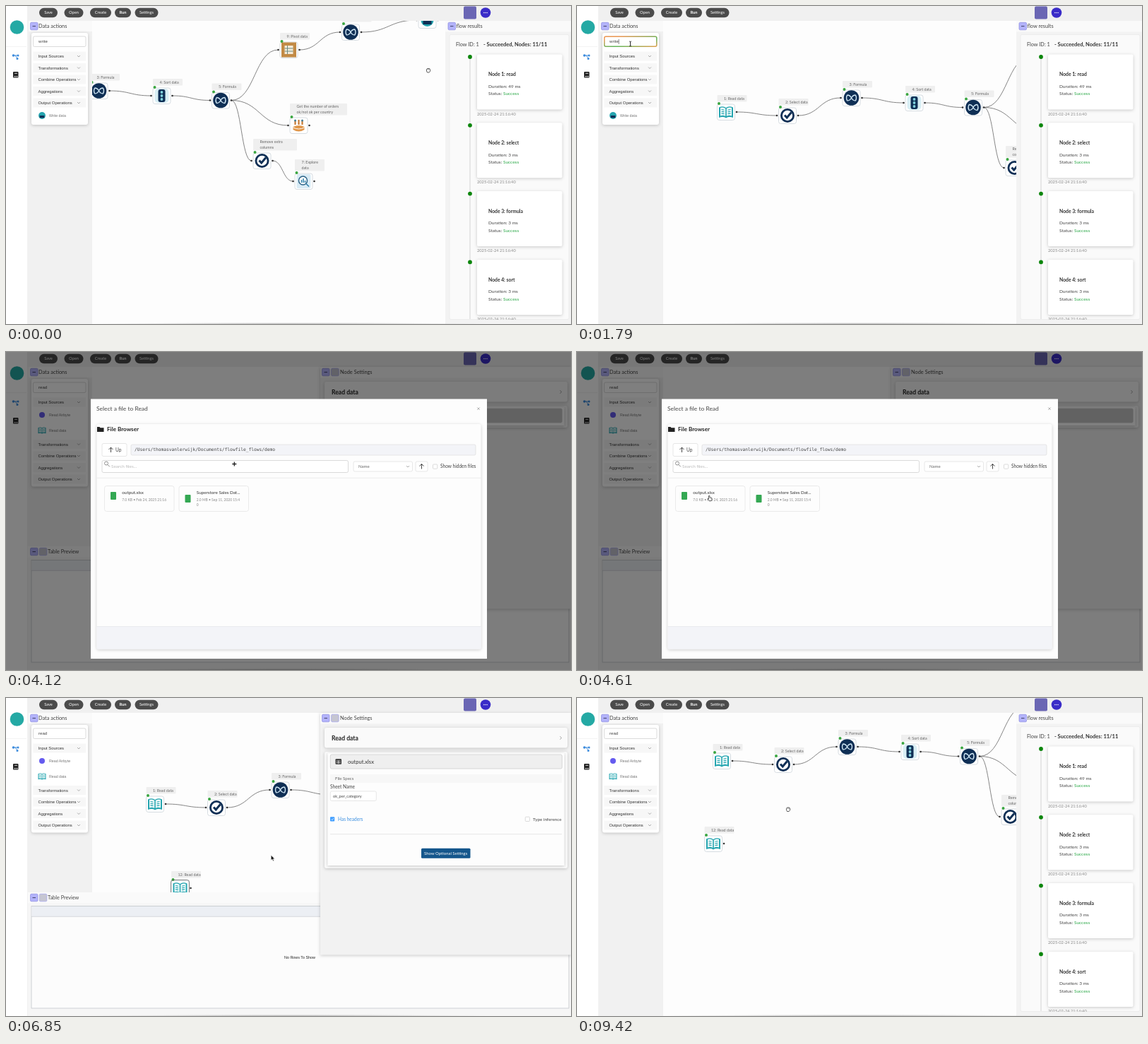
These frames come from a looping animation (800 by 450 pixels, 9450 ms). An HTML page:

```html
<!DOCTYPE html>
<html lang="en">
<head>
<meta charset="utf-8">
<title>Flow editor</title>
<style>
html, body { margin: 0; width: 100%; height: 100%; overflow: hidden; background: #fff; }
svg { display: block; }
#stage { width: 100vw; height: 100vh; }
text { font-family: Lato, sans-serif; white-space: pre; }
.ui { font-family: "Liberation Sans", sans-serif; }
.mono { font-family: "DejaVu Sans Mono", monospace; }
.card { filter: drop-shadow(0 1px 2px rgba(0,0,0,.2)); }
</style>
</head>
<body>
<svg id="stage" viewBox="0 0 800 450"></svg>
<script>
const LOOP = 9450;
const NAVY = '#0f2f55', TEAL = '#25a5b0', GREEN = '#3aa640';

// Shape helpers; text is centred vertically on y.
const rect = (x, y, w, h, fill, more = '') =>
  `<rect x="${x}" y="${y}" width="${w}" height="${h}" fill="${fill}" ${more}/>`;
const circle = (x, y, r, fill, more = '') =>
  `<circle cx="${x}" cy="${y}" r="${r}" fill="${fill}" ${more}/>`;
const line = (d, stroke, width = 1, more = '') =>
  `<path d="${d}" fill="none" stroke="${stroke}" stroke-width="${width}" ${more}/>`;
const shape = (d, fill, more = '') => `<path d="${d}" fill="${fill}" ${more}/>`;
const text = (x, y, s, size, fill = '#444', more = '') =>
  `<text x="${x}" y="${y + size * 0.35}" font-size="${size}" fill="${fill}" ${more}>${s}</text>`;
const at = (x, y, body, more = '') => `<g transform="translate(${x} ${y})" ${more}>${body}</g>`;
const group = (id, body) => `<g id="${id}">${body}</g>`;
const BOLD = 'font-weight="700"', MID = 'text-anchor="middle"', UI = 'class="ui"';
const CARD = 'rx="3" class="card"';
const outline = (color, rx = 2) => `rx="${rx}" stroke="${color}" stroke-width=".7"`;

const chevron = (x, y) => line(`M${x - 2} ${y - 1}l2 2 2-2`, '#777', .6);
const toggleButton = (x, y) =>
  rect(x, y, 10.5, 10.5, '#b3b3fb', outline('#8c8ce0', 1.5)) + line(`M${x + 3} ${y + 5.3}h4.5`, '#335', .9);
const frameButton = (x, y) => rect(x, y, 10.5, 10.5, '#c6c6d2', outline('#a3a3ee', 1.5));

const icons = {
  book: shape('M-10-6.5Q-4-9 0-6 4-9 10-6.5V8Q4 6 0 8.5-4 6-10 8Z', TEAL) +
    shape('M-8-6Q-4-7.500-.8-5V6Q-4 4-8 5.500ZM8-6Q4-7.500.8-5V6Q4 4 8 5.500Z', '#f2fbfb') +
    line('M-6.500-3.500l4 .7m-4 2l4 .7m-4 2l4 .7M6.500-3.500l-4 .7m4 2l-4 .7m4 2l-4 .7', TEAL, 1.1),
  check: circle(0, 0, 10, NAVY) + circle(0, 0, 7.2, '#fff') + line('M-4-.5l3.200 3.500L5.500-4.500', NAVY, 3),
  formula: circle(0, 0, 10.8, NAVY) +
    line('M-6-4Q-2-4 0 0T6 4M6-4Q2-4 0 0T-6 4M-6-4q-2 4 0 8M6-4q2 4 0 8', '#cfe6f4', 1.3),
  sort: rect(-10, -10, 20, 20, '#d8eef4', 'rx="5"') + rect(-5, -9, 10, 18, NAVY, 'rx="3"') +
    [-5, 0, 5].map(y => circle(0, y, 1.9, '#7fd0dc')).join(''),
  pivot: rect(-10.5, -10.5, 21, 21, '#c28a45') + rect(-6, -6, 12, 12, '#f3ead7') +
    line('M-2-6V6M-6-2H6M-6 2H6', '#6d8a80', 1),
  group: shape('M-8 2Q0-2 8 2V6Q0 11-8 6Z', '#e0964a') + line('M-8 3Q0 7 8 3', '#fff', 1) +
    line('M-5-1v-6M0-1v-7M5-1v-6', '#c77a35', 2.2) + circle(-5, -7, 1.5, '#47829a') + circle(5, -7, 1.5, '#47829a'),
  explore: rect(-10, -10, 20, 20, '#d9ebf5', 'rx="2"') + circle(-1, -1, 6, '#fff', 'stroke="#2c6387" stroke-width="1.500"') +
    line('M-3 2v-4M-.5 2v-6M2 2v-3M3.500 3.500l4 4', '#2c7fa8', 1.5),
  output: circle(0, 0, 9, TEAL) + shape('M-6 0h12v6h-12z', NAVY)
};

function node(x, y, icon, labels, width = 42, ports = 'both') {
  const two = labels.length > 1, top = two ? -31 : -24;
  return at(x, y,
    rect(-12.5, top, width, two ? 16.5 : 9.5, '#efefef', 'rx="1"') +
    labels.map((s, i) => text(-3, (two ? -26.7 : -19) + i * 7.5, s, 5.35, '#666')).join('') +
    rect(-12.5, -11, 25, 22.5, '#fff', 'rx="3" stroke="#ccd3da" stroke-width=".8"') +
    icons[icon] + circle(-10, -12, 2, GREEN) +
    (ports === 'both' ? circle(-15, 0, 1.3, '#333') : '') + circle(15, 0, 1.3, '#333'));
}

const edge = (x1, y1, x2, y2) => {
  const mid = (x1 + x2) / 2;
  return line(`M${x1 + 15} ${y1}C${mid} ${y1} ${mid} ${y2} ${x2 - 15} ${y2}`, '#666', .8);
};

const nodes = [
  [211, 150, 'book', ['1: Read data'], 42, 'out'],
  [298, 155, 'check', ['2: Select data']],
  [388.5, 130, 'formula', ['3: Formula']],
  [477.500, 137, 'sort', ['4: Sort data']],
  [561, 143.500, 'formula', ['5: Formula']],
  [657.500, 72, 'pivot', ['9: Pivot data']],
  [745, 47, 'formula', ['']],
  [853.500, 30, 'output', ['']],
  [671.500, 179, 'group', ['Get the number of orders', 'ok/not ok per country'], 81],
  [619.500, 229, 'check', ['Remove extra', 'columns'], 62],
  [678.500, 258, 'explore', ['7: Explore', 'data']]
];
const links = [[0, 1], [1, 2], [2, 3], [3, 4], [4, 5], [5, 6], [6, 7], [4, 8], [4, 9], [9, 10]];

const canvas = `<svg x="122" y="21" width="678" height="429" viewBox="122 21 678 429">` +
  rect(122, 21, 678, 429, '#fdfdfd') + group('world',
    links.map(([a, b]) => edge(nodes[a][0], nodes[a][1], nodes[b][0], nodes[b][1])).join('') +
    nodes.map(n => node(...n)).join('') +
    group('added', node(0, 0, 'book', ['12: Read data'], 42, 'out') +
      group('selected', rect(-13, -11.5, 26, 23.5, 'none', outline('#555', 3))))) + '</svg>';

function toolbar() {
  const buttons = [['Save', 60, 26], ['Open', 96, 27], ['Create', 134, 30], ['Run', 165.5, 23], ['Settings', 199, 33]];
  return rect(30, 0, 770, 21, '#f0f0f0') + buttons.map(([s, x, w]) =>
    rect(x - w / 2, 2.8, w, 13.5, '#4b4b4b', 'rx="6.700"') +
    text(x, 9.5, s, 5.7, '#fff', MID + (s === 'Run' ? ' ' + BOLD : ''))).join('') +
    rect(648, 0.5, 18, 18, '#6a66b4', 'rx="2"') + circle(679, 9.5, 7.3, '#3a2cc8') +
    [-2.2, 0, 2.2].map(d => circle(679 + d, 9.5, .7, '#fff')).join('');
}

function navigation() {
  return rect(0, 0, 30, 450, '#fff') + circle(15.5, 30, 9.8, '#24a9a4') + line('M0 57.500h29', '#eee', .7) +
    line('M10 70h3l3 4M13 70h4', '#3f8ddd', 1) + circle(10.5, 70, 1.8, '#3f8ddd') +
    circle(17, 70, 1.5, '#3f8ddd') + circle(16, 74.500, 1.5, '#3f8ddd') +
    rect(10, 93, 7.5, 8.500, '#222', 'rx="1"') + line('M12 95.300h4M11 99.800h6', '#fff', .8);
}

const sections = ['Input Sources', 'Transformations', 'Combine Operations', 'Aggregations', 'Output Operations'];
function actionList(id, items) {
  let y = 71, body = '';
  sections.forEach((name, i) => {
    body += rect(38.5, y - 6.500, 74.500, 13, '#f7f7f7') + text(45.5, y, name, 5.9, '#333', UI) + chevron(103, y);
    const inside = items.filter(item => item.section === i);
    inside.forEach((item, k) => {
      const row = y + 18 + k * 21.800;
      body += item.icon(51, row) + text(61, row, item.name, 5.25, '#777', UI);
    });
    y += inside.length === 2 ? 59.500 : inside.length ? 35 : 16.5;
  });
  return group(id, rect(36, 38, 80, y - 44 + (items.some(item => item.section === 4) ? 2 : 0), '#fff', CARD) + body);
}
const smallIcon = name => (x, y) => at(x, y, `<g transform="scale(.55)">${icons[name]}</g>`);

function actions() {
  return rect(30, 21, 92, 429, '#f1f1f1') + rect(32, 21, 90, 15, '#fafafa') + toggleButton(34.5, 23.3) +
    text(46, 28.7, 'Data actions', 7.35) +
    actionList('writeList', [{ section: 4, name: 'Write data', icon: smallIcon('output') }]) +
    actionList('plainList', []) +
    actionList('readList', [
      { section: 0, name: 'Read Airbyte', icon: (x, y) => circle(x, y, 4, '#655bef') },
      { section: 0, name: 'Read data', icon: smallIcon('book') }]) +
    rect(38.5, 43, 74.500, 14.500, '#fff', outline('#ccc')) +
    group('focus', rect(38.8, 43.3, 74, 14, '#fff', 'rx="2" stroke="url(#focusGlow)" stroke-width="1.500"')) +
    `<text id="query" class="ui" x="46" y="52.300" font-size="6.1" fill="#444"></text>` +
    group('caret', line('M0 47v7', '#333', .6));
}

function results() {
  const steps = [['read', 49], ['select', 3], ['formula', 3], ['sort', 3]];
  return group('results', rect(622, 21, 178, 429, '#f3f3f3') + rect(622, 21, 178, 15.5, '#fafafa') +
    toggleButton(626, 23.3) + text(637.500, 28.7, 'flow results', 7.35) +
    rect(628, 40.500, 169, 403, '#fafafa', outline('#e8e8e8')) +
    text(637, 54.500, 'Flow ID: 1', 7.3) + text(676, 54.500, '- Succeeded, Nodes: 11/11', 7.5, '#333', BOLD) +
    line('M657 72V443', '#ddd', 1.3) +
    steps.map(([name, ms], i) => at(0, i * 96.800,
      circle(657, 72, 2.9, '#0c860c') + rect(667, 68.5, 120.500, 78, '#fff', 'rx="2" class="card"') +
      text(683, 96.800, `Node ${i + 1}: ${name}`, 6.8, '#333', BOLD) +
      text(683, 113.500, `Duration: ${ms} ms`, 6.45) +
      text(683, 124, 'Status: <tspan fill="#28a745">Success</tspan>', 6.5) +
      text(667, 152.700, '2025-02-24 21:16:40', 5.7, '#888'))).join('') +
    rect(622, 444, 178, 6, '#f3f3f3'));
}

function preview() {
  return rect(31, 275, 769, 175, '#f6f6f6') + rect(31, 275, 769, 15.500, '#fafafa') +
    toggleButton(34.500, 277.3) + frameButton(47.300, 277.3) + text(59, 282.700, 'Table Preview', 7.3) +
    rect(36, 294.500, 761, 144.500, '#fcfcfc', 'stroke="#c3c6ca" stroke-width=".8"') +
    rect(36.400, 295, 760.200, 14, '#eceff4') + line('M36 309.300h761', '#c8ccd0', .7) +
    text(416, 367, 'No Rows To Show', 5.4, '#222', UI + ' ' + MID);
}

const checkbox = (x, y) => rect(x, y, 6.2, 6.2, '#fff', outline('#ccc', 1));
function settings() {
  const fileButton = (label, fill) => rect(459.300, 80, 328, 20, fill, outline('#c9c9c9')) +
    rect(466.500, 86.300, 8.500, 7.500, '#333', 'rx="1"') + line('M467.500 89.200h6.500M467.500 91.600h6.500M470.700 88.300v4.700', '#fff', .7) +
    text(484, 90, label, 7.6, '#333');
  return rect(445, 21, 355, 342.500, '#f2f2f2', 'class="card"') + rect(445, 21, 355, 15.5, '#fafafa') +
    toggleButton(447.500, 23.3) + frameButton(460.600, 23.3) + text(473, 28.7, 'Node Settings', 7.4) +
    rect(451, 42, 344, 28.500, '#fafafa', CARD) + text(461, 56.500, 'Read data', 8.6, '#222', BOLD) +
    line('M784.500 54.300l2 2.200-2 2.200', '#777', .7) +
    group('emptyForm', rect(451, 76, 344, 31, '#fafafa', CARD) + rect(455.500, 78, 335, 26, '#fff', 'class="card"') +
      fileButton('Choose a file...', '#c5c5c5')) +
    group('fileForm', rect(451, 76, 344, 165, '#fafafa', CARD) + rect(455.500, 78, 335, 159, '#fdfdfd', 'class="card"') +
      fileButton('output.xlsx', '#efefef') + rect(459, 108, 328, 12, '#f7f7f7') +
      text(466, 114, 'File Specs', 6.05, '#666') + text(459, 125.700, 'Sheet Name', 6.55) +
      rect(459.300, 132, 65, 13.500, '#fff', outline('#ddd')) +
      group('placeholder', text(463, 138.700, 'Select or type sheet nan', 5.45, '#888')) +
      group('sheet', text(463, 138.700, 'ok_per_category', 5.6)) +
      rect(459, 168.300, 6.2, 6.2, '#409eff', 'rx="1"') + line('M460.500 171.400l1.300 1.300 2.200-2.600', '#fff', .8) +
      text(470, 171.500, 'Has headers', 6.55, '#3b8fe0') + checkbox(735.300, 168.300) +
      text(746, 171.500, 'Type inference', 6.3) + line('M459 192.700h328', '#ddd', .7) +
      rect(588, 212.800, 69.500, 14, '#14568c', 'rx="1.500"') +
      text(622.700, 219.800, 'Show Optional Settings', 5.97, '#fff', MID) +
      group('dropdown', rect(459, 146.500, 52, 13.500, '#ececec', CARD) + text(465, 153, 'ok_per_category', 5.6, '#777')));
}

function dialog() {
  const file = (x, name, detail, extra = '') => rect(x, 189.500, 98.500, 36, '#fdfdfd', outline('#e3e3e3', 3)) +
    rect(x + 8.500, 198, 8, 11, '#34a853', 'rx="1"') .replace('198', extra ? '202' : '198') +
    text(x + 24.800, 199, name, 6.3, '#333') + text(x + 24.800, 209, detail, 4.95, '#888') +
    text(x + 24.800, 216, extra, 4.95, '#888');
  const up = (x, y) => line(`M${x} ${y + 3.500}v-7m-3 3l3-3 3 3`, '#333', .9);
  return group('dialog', rect(0, 0, 800, 450, '#000', 'opacity=".5"') + rect(120, 66.500, 561, 367.500, '#fdfdfd') +
    text(128, 80.500, 'Select a file to Read', 8.45) + line('M667.300 78.500l3.400 3.400m0-3.400l-3.400 3.400', '#888', .7) +
    rect(128.500, 102, 544, 318.500, '#fdfdfd', CARD) +
    shape('M129 106h3.500l1 1.200h5V113h-9.500z', '#222') + text(143, 109.500, 'File Browser', 8.1, '#222', BOLD) +
    rect(136, 129.500, 35, 18, '#fff', outline('#ddd')) + up(148.500, 138.500) + text(155, 138.500, 'Up', 6.6) +
    rect(177, 131, 488, 15, '#f3f4f8', outline('#ddd')) +
    text(182, 138.300, '/Users/thomasvanlerwijk/Documents/flowfile_flows/demo', 6.24, '#444', 'class="mono"') +
    rect(136, 153.500, 348.500, 17, '#fff', outline('#ccc')) +
    circle(142, 157.500, 2.5, 'none', 'stroke="#777" stroke-width=".8"') + line('M144 159.500l2.800 2.800', '#777', .9) +
    text(149, 162, 'Search files...', 6.4, '#bbb') +
    rect(492, 155, 83.500, 14, '#fff', outline('#ddd')) + text(499, 162, 'Name', 6.1, '#666') + chevron(569, 162) +
    rect(580, 155, 17, 14, '#fff', outline('#ddd')) + up(588.500, 162) + checkbox(604.500, 159) +
    text(615, 162, 'Show hidden files', 6.55) + line('M128.500 178.300h544', '#e6e6e6', .7) +
    file(139.500, 'output.xlsx', '7.0 KB • Feb 24, 2025 21:16') +
    file(245, 'Superstore Sales Dat...', '2.0 MB • Sep 11, 2020 15:4', '0') +
    rect(128.500, 388.500, 544, 32, '#f3f4f8') + line('M128.500 388.500h544', '#e3e5ea', .7));
}

const EDGE = 'stroke="#333" stroke-width=".8"';
const cursors = {
  fist: shape('M-2.500-1Q-2-3 0-2.500 2.500-3 2.700-.5 3 2 1 3H-1.500Q-3 1-2.500-1Z', '#fff', EDGE) + line('M-.8-2v1.500M.9-2v1.500', '#333', .5),
  beam: line('M-1.500-3.500q1.500 0 1.500 1v5q0 1 1.500 1M1.500-3.500q-1.500 0-1.500 1v5q0 1-1.500 1', '#222', .8),
  arrow: shape('M0 0v7l1.700-1.500 1.200 2.600 1.200-.5-1.200-2.500h2.300z', '#111', 'stroke="#fff" stroke-width=".5"'),
  cross: line('M-3 0h6M0-3v6', '#222', 1.3),
  pointer: shape('M-1.500-3.500q.8-.7 1.500 0V-1l3 .7V2l-1 1.700h-3L-3 .8l1.500.2z', '#fff', EDGE)
};

document.getElementById('stage').innerHTML = `<defs>
  <linearGradient id="focusGlow" x1="0" x2="1" y2="1"><stop offset=".15" stop-color="#ee9a55"/><stop offset=".6" stop-color="#5fb75b"/><stop offset="1" stop-color="#e0a04e"/></linearGradient>
  <radialGradient id="bottomShade" cy="1"><stop stop-color="#000" stop-opacity=".3"/><stop offset="1" stop-opacity="0"/></radialGradient>
</defs>` + canvas + toolbar() + navigation() + actions() + results() +
  group('nodePanels', preview() + settings()) +
  rect(110, 446, 580, 4, 'url(#bottomShade)') + dialog() +
  group('pointer', Object.entries(cursors).map(([k, v]) => group('cursor-' + k, v)).join(''));

// Each key is [time, x, y]; the motion eases between keys.
const panKeys = [[0, -257, -10], [300, -257, -10], [900, 0, 0], [7450, 0, 0], [7900, -6, -61]];
const addedKeys = [[0, 246.500, 269], [8350, 246.500, 269], [8850, 199, 267]];
const pointerKeys = [
  [0, 598, 91], [280, 240, 120], [300, 240, 120], [900, 497, 130], [1270, 68, 61], [1600, 68, 61],
  [1760, 75.500, 53.500], [2280, 75.500, 53.500], [2520, 73, 111], [2600, 73, 111], [2950, 247, 268], [3200, 247, 268],
  [3560, 509, 92], [3900, 509, 92], [4300, 188, 207], [4650, 188, 207], [5050, 491, 139],
  [5150, 491, 139], [5380, 494, 156], [5580, 494, 156], [6300, 470, 185], [6450, 470, 185],
  [7300, 263, 267], [7450, 263, 267], [7900, 257, 206], [8200, 257, 206], [8350, 240, 207],
  [8850, 193, 205], [9360, 299, 157.500]
];
const cursorKeys = [[0, 'fist'], [1150, 'arrow'], [1610, 'beam'], [2400, 'pointer'], [3000, 'fist'],
  [3400, 'cross'], [4200, 'pointer'], [4700, 'arrow'], [5040, 'pointer'], [5700, 'arrow'], [6900, 'fist']];
const queryKeys = [[0, 'write'], [1910, ''], [2030, 'r'], [2120, 're'], [2210, 'rea'], [2300, 'read']];

const ease = u => u * u * (3 - 2 * u);
function along(keys, t) {
  const next = keys.findIndex(k => k[0] > t);
  if (next < 0) return keys[keys.length - 1].slice(1);
  const a = keys[next - 1], b = keys[next], u = ease((t - a[0]) / (b[0] - a[0]));
  return [a[1] + (b[1] - a[1]) * u, a[2] + (b[2] - a[2]) * u];
}
const latest = (keys, t) => keys.filter(k => k[0] <= t).pop()[1];

const el = id => document.getElementById(id);
const show = (id, on) => { el(id).style.display = on ? '' : 'none'; };
const move = (id, [x, y]) => el(id).setAttribute('transform', `translate(${x} ${y})`);

function render(now) {
  const t = now % LOOP;
  const during = (from, to) => t >= from && t < to;
  const panels = during(3220, 7450), query = latest(queryKeys, t), focused = during(1610, 2600);

  move('world', along(panKeys, t));
  move('added', along(addedKeys, t));
  move('pointer', along(pointerKeys, t));
  show('added', t >= 2950);
  show('selected', panels);

  el('query').textContent = query;
  show('writeList', query === 'write');
  show('readList', query === 'read');
  show('plainList', query !== 'write' && query !== 'read');
  show('focus', focused);
  show('caret', focused);
  move('caret', [46.300 + el('query').getComputedTextLength(), 0]);

  show('results', !panels);
  show('nodePanels', panels);
  show('emptyForm', t < 4650);
  show('fileForm', t >= 4650);
  show('dropdown', during(5100, 5580));
  show('placeholder', t < 5580);
  show('sheet', t >= 5580);
  show('dialog', during(3700, 4650));

  const cursor = latest(cursorKeys, t);
  for (const kind in cursors) show('cursor-' + kind, kind === cursor);
  requestAnimationFrame(render);
}
requestAnimationFrame(render);
</script>
</body>
</html>
```
